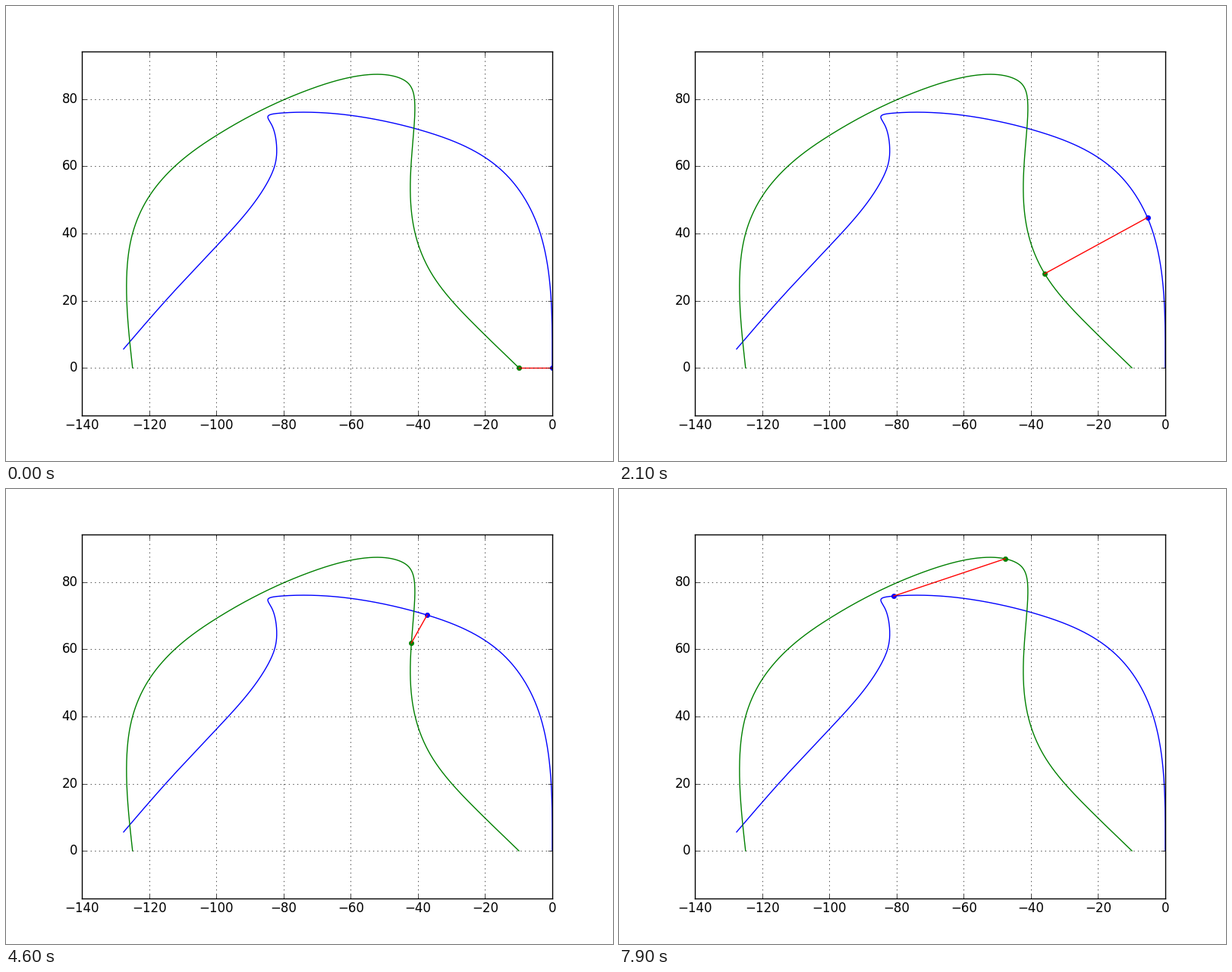
A matplotlib script that plays this animation: 800 px wide and 600 px high, repeating every 8000 ms.

```python
import numpy as np
import matplotlib.pyplot as plt
from matplotlib.animation import FuncAnimation

FRAMES, STEP = 80, 100
SCALE = 620 / 140          # pixels per data unit
ZERO_X, ZERO_Y = 720, 477.15
BLUE, GREEN, RED = "#0000ff", "#008000", "#ff0000"

plt.style.use("classic")
plt.rcParams.update({"font.family": "DejaVu Sans", "font.size": 12,
                     "xtick.major.pad": 3})

# Key poses: seconds, then stage pixels.
BLUE_KEYS = [
    (0, 720, 477.15), (0.8, 718.7, 392), (2.1, 696.5, 279), (3, 658, 221.2),
    (4.6, 555, 166.2), (6.2, 444.3, 143), (7, 399, 140.1), (7.9, 362, 141.2),
    (8.8, 345.2, 145.6), (9.6, 350.3, 157), (11, 356.8, 191),
    (12, 352, 217), (13.2, 330, 255.5), (15.1, 277.5, 316.5),
    (17.3, 210, 389), (19.1, 155, 452.3)]
GREEN_KEYS = [
    (0, 676, 477.15), (0.8, 624.3, 427), (2.1, 561, 353), (3, 539, 299),
    (4.6, 534.3, 203), (6.2, 538.8, 130), (7.2, 529.5, 101.3),
    (7.9, 509, 92), (8.4, 491.5, 90.1), (9.4, 454, 94), (10.8, 400, 110),
    (14.1, 277.5, 170.6), (15.4, 232, 203), (16.9, 189, 250.5),
    (18.3, 166, 303), (19.7, 159, 359), (22.6, 166.8, 477.15)]


def spline(t, y, at):
    """Natural cubic spline through (t, y), evaluated at `at`."""
    n, h = len(t), np.diff(t)
    slope = np.diff(y) / h
    A, rhs = np.eye(n), np.zeros(n)
    for i in range(1, n - 1):
        A[i, i - 1:i + 2] = h[i - 1], 2 * (h[i - 1] + h[i]), h[i]
        rhs[i] = 6 * (slope[i] - slope[i - 1])
    m = np.linalg.solve(A, rhs)
    k = np.clip(np.searchsorted(t, at, side="right") - 1, 0, n - 2)
    d = at - t[k]
    b = slope[k] - h[k] * (2 * m[k] + m[k + 1]) / 6
    return y[k] + d * (b + d * (m[k] / 2 + d * (m[k + 1] - m[k]) / (6 * h[k])))


def flight(keys):
    """Whole trajectory and the position at each frame, in data units."""
    t, x, y = np.array(keys, float).T
    x, y = (x - ZERO_X) / SCALE, (ZERO_Y - y) / SCALE

    def at(when):
        return spline(t, x, when), spline(t, y, when)

    return at(np.linspace(0, t[-1], 1500)), at(np.arange(FRAMES) * STEP / 1000)


fig = plt.figure(figsize=(8, 6), dpi=100, facecolor="white")
ax = fig.add_axes([0.125, 0.1, 0.775, 0.8])
ax.set_xlim(-140, 0)
ax.set_ylim((ZERO_Y - 540) / SCALE, (ZERO_Y - 60) / SCALE)
ax.set_yticks(range(0, 81, 20))
ax.grid(True)

dots, routes = [], []
for keys, color in ((BLUE_KEYS, BLUE), (GREEN_KEYS, GREEN)):
    path, route = flight(keys)
    ax.plot(*path, color=color, lw=1)
    dots += ax.plot([], [], "o", color=color, ms=4.5, mew=0.5, mec=color)
    routes.append(np.column_stack(route))
link, = ax.plot([], [], color=RED, lw=1)


def update(i):
    ends = np.array([route[i] for route in routes])
    for dot, (x, y) in zip(dots, ends):
        dot.set_data([x], [y])
    link.set_data(*ends.T)
    return *dots, link


anim = FuncAnimation(fig, update, frames=FRAMES, interval=STEP,
                     repeat=True, repeat_delay=0)
plt.show()
```
